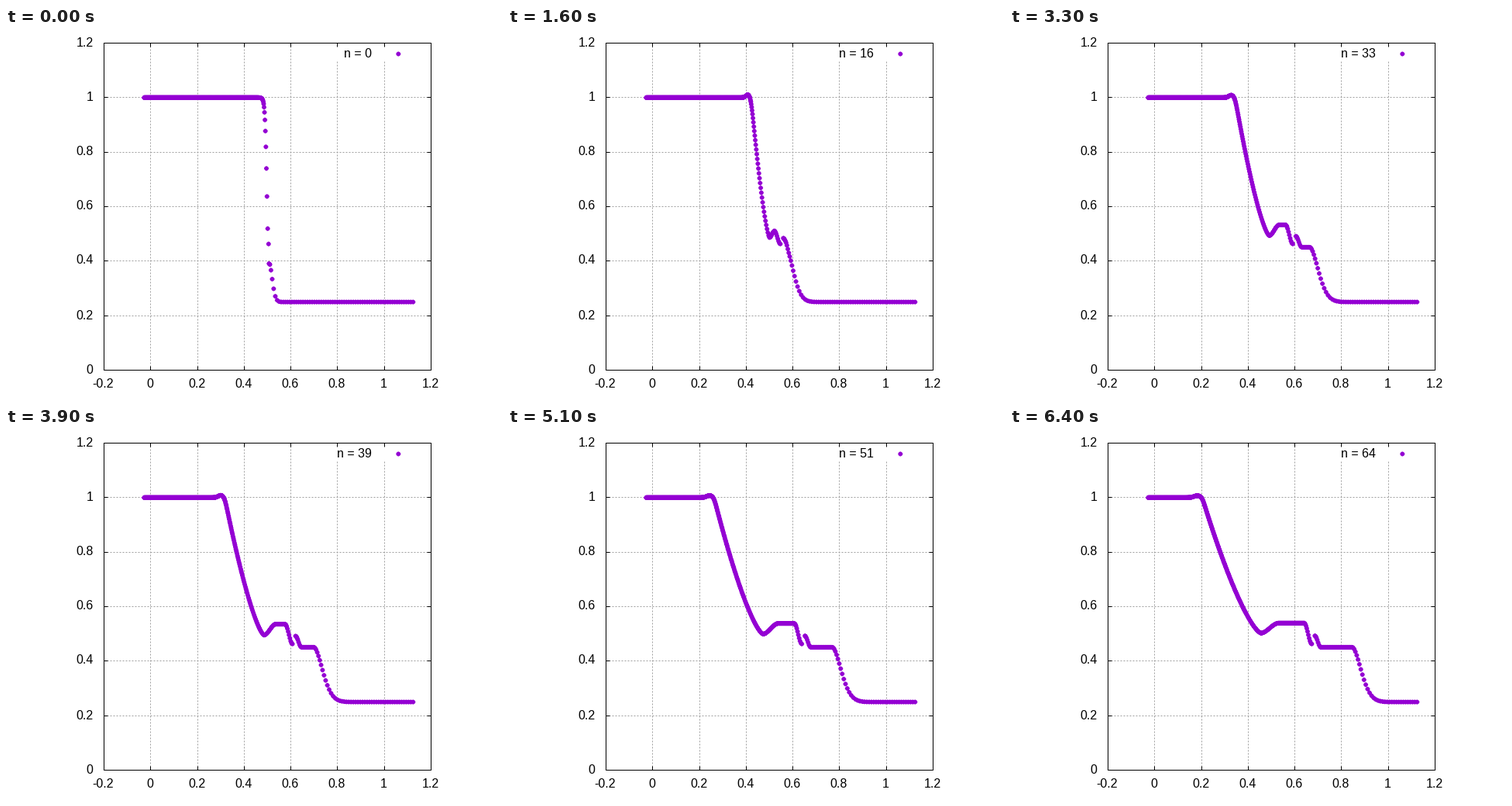
Recreate the animation shown at these times as a matplotlib script. Size 640 by 480 pixels, loop 6.5 s.

```python
import numpy as np
import matplotlib.pyplot as plt
from matplotlib.animation import FuncAnimation

W, H, DPI = 640, 480, 100
PT = 72 / DPI                       # points per pixel
LEFT, RIGHT, TOP, BOTTOM = 126.5, 548.5, 19.5, 441.5
STEP_X, STEP_Y = (RIGHT - LEFT) / 7, (BOTTOM - TOP) / 6
UNIT_Y = 5 * STEP_Y
X_FIRST, X_LAST = 178.2, 525.3      # outermost particles, in pixels
RHO_LEFT, RHO_RIGHT, RHO_DIP = 1.0, 0.25, 0.463
FRAMES, INTERVAL = 65, 100
VIOLET = "#9400d3"
FONT = dict(family="Liberation Sans", size=16 * PT, color="black")


def ease(s):
    s = np.clip(s, 0, 1)
    return s * s * (3 - 2 * s)


def grow(n, span):
    return 1 - np.exp(-n / span)


def contact(n):
    return 338.8 + 0.79 * n


def left_gas(n):
    """Density from the left end to the contact: rarefaction, trough, plateau."""
    end = contact(n)
    x = np.linspace(X_FIRST, end, 3000)
    head, foot = 335.5 - 1.367 * n, 338.4 - 0.0036 * n * n
    trough = 0.47 + 0.0041 * np.sqrt(n)
    plateau = 0.43 + 0.11 * grow(n, 12)

    into = 1.2 * np.logaddexp(0, (x - head) / 1.2)      # rounded corner
    s = np.clip(into / (foot - head), 0, 1)
    fan = trough + (RHO_LEFT - trough) * (1 - s) ** 1.4

    width = 3 + 0.05 * n
    bump = 0.035 * grow(n, 1) * (n + 1) ** -0.38
    bump = bump * np.exp(-((x - head + width) / width) ** 2)

    rise = ease((x - foot) / min(0.3 + 0.38 * n, 23))
    drop = 0.3 + 9.3 * grow(n, 10)
    fall = ease((x - end + drop) / drop)
    return x, fan + bump + (plateau - trough) * rise - (plateau - RHO_DIP) * fall


def right_gas(n):
    """Density from the contact to the right end: spike, plateau, shock."""
    start = contact(n) + 0.5 + 3.5 * grow(n, 6)
    x = np.linspace(start, X_LAST, 3000)
    plateau = 0.391 + 0.06 * grow(n, 3)
    spike = 0.042 * grow(n, 10) * (1 - ease((x - start) / 7.5))

    width = 0.33 + 0.67 * grow(n, 12)
    front = 344.5 + 1.785 * n - 3 * grow(n, 3) - 14 * width
    z = np.maximum(x - front, 0) / (16 * width)
    return x, RHO_RIGHT + (plateau - RHO_RIGHT) * np.exp(-z ** 1.75) + spike


def integral(x, f):
    return np.concatenate([[0], np.cumsum(np.diff(x) * (f[1:] + f[:-1]) / 2)])


class Side:
    """Particles of one gas, each carrying a fixed share of its mass."""

    def __init__(self, gas, rest, weights):
        self.gas, self.rest = gas, rest
        self.share = np.concatenate([[0], np.cumsum(weights)]) / weights.sum()
        self.mass = integral(*gas(0))[-1]

    def place(self, n):
        x, rho = self.gas(n)
        extra = rho - self.rest
        need = self.mass - self.rest * (x[-1] - x[0])
        scale = np.clip(need / integral(x, extra)[-1], 0.5, 1.6)
        m = integral(x, np.maximum(self.rest + scale * extra, 0.08))
        px = np.interp(self.share * m[-1], m, x)
        return px, BOTTOM - UNIT_Y * np.interp(px, x, rho)


SIDES = [Side(left_gas, RHO_LEFT, np.ones(300)),
         Side(right_gas, RHO_RIGHT, 1 - 0.35 * np.exp(-np.arange(66) / 6))]

# Eight-armed star drawn as four separate strokes
ARMS = [(3, 0), (0, 3), (2, 2), (2, -2)]
STAR_X = np.array([v for a, b in ARMS for v in (-a, a, np.nan)])
STAR_Y = np.array([v for a, b in ARMS for v in (-b, b, np.nan)])


def stars(x, y):
    return np.add.outer(x, STAR_X).ravel(), np.add.outer(y, STAR_Y).ravel()


fig = plt.figure(figsize=(W / DPI, H / DPI), dpi=DPI, facecolor="white")
ax = fig.add_axes([0, 0, 1, 1])
ax.set_xlim(0, W)
ax.set_ylim(H, 0)
ax.axis("off")


def line(x, y, width=1, **kw):
    return ax.plot(x, y, lw=width * PT, snap=False, solid_capstyle="butt",
                   dash_capstyle="butt", **kw)[0]


def tick_text(v):
    return f"{round(v, 1):g}"


GRID = dict(color="#a0a0a0", ls=(0, (2, 2)), zorder=1)
EDGE = dict(color="black", zorder=4)
DOTS = dict(color=VIOLET, width=1.8, zorder=3)

for i in range(8):
    x = np.floor(LEFT + i * STEP_X) + 0.5
    if 0 < i < 7:
        line([x, x], [BOTTOM, 43.5 if i in (5, 6) else TOP], **GRID)
    line([x, x], [BOTTOM, BOTTOM - 5], **EDGE)
    line([x, x], [TOP, TOP + 5], **EDGE)
    ax.text(x - 1, 464.5, tick_text(0.2 * i - 0.2).replace("-0.2", "-0.2"),
            ha="center", va="baseline", **FONT)

for i in range(7):
    y = np.floor(BOTTOM - i * STEP_Y) + 0.5
    if 0 < i < 6:
        line([LEFT, RIGHT], [y, y], **GRID)
    line([LEFT, LEFT + 5], [y, y], **EDGE)
    line([RIGHT, RIGHT - 5], [y, y], **EDGE)
    ax.text(112.5, y + 4, tick_text(0.2 * i),
            ha="right", va="baseline", **FONT)

line([LEFT, RIGHT, RIGHT, LEFT, LEFT], [TOP, TOP, BOTTOM, BOTTOM, TOP],
     solid_joinstyle="miter", **EDGE)

line(*stars(np.array([506.3]), np.array([33.5])), **DOTS)
dots = line([], [], **DOTS)
label = ax.text(472, 38, "", ha="right", va="baseline", **FONT)


def update(n):
    x, y = np.hstack([side.place(n) for side in SIDES])
    dots.set_data(*stars(x, y))
    label.set_text(f"n = {n}")
    return dots, label


anim = FuncAnimation(fig, update, frames=FRAMES, interval=INTERVAL,
                     init_func=lambda: update(0), repeat=True, repeat_delay=0)
plt.show()
```
